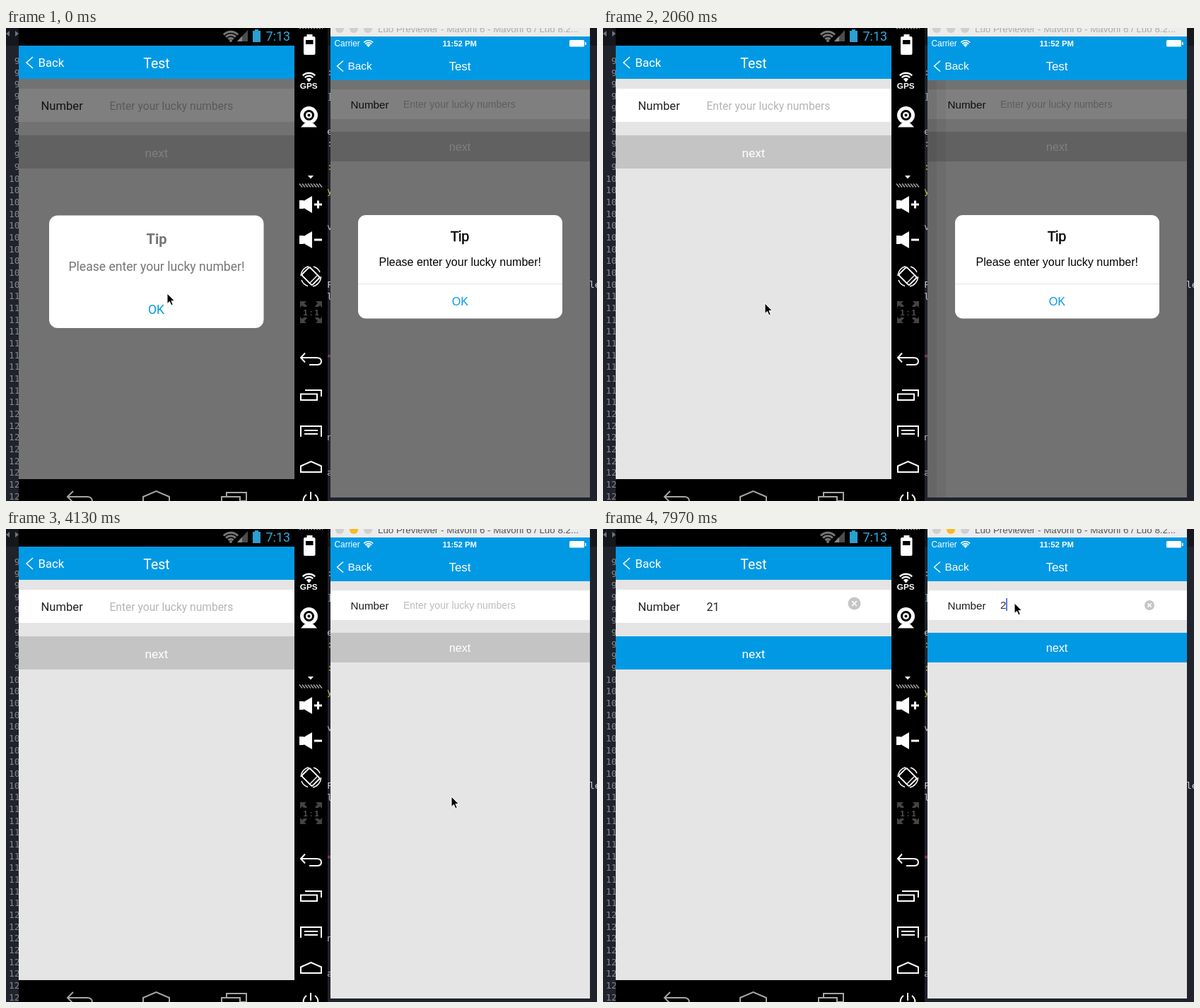
These frames come from a looping animation (836 px wide and 670 px high, 8000 ms). An HTML page:

```html
<!DOCTYPE html>
<html lang="en">
<head>
<meta charset="utf-8">
<title>Lucky number form</title>
<style>
html, body { margin: 0; width: 100%; height: 100%; overflow: hidden; background: #000; }
svg { display: block; width: 836px; height: 670px; }
.a { font-family: Roboto, sans-serif; }
.i { font-family: "Liberation Sans", Arial, sans-serif; }
.m { font-family: "DejaVu Sans Mono", monospace; }
</style>
</head>
<body>
<svg id="stage" viewBox="0 0 836 670" xmlns="http://www.w3.org/2000/svg"></svg>
<script>
const BLUE = '#0299e4', LOOP = 8000, STEP = 147.6;
const stage = document.getElementById('stage');

const rect = (x, y, w, h, fill, more = '') =>
  `<rect x="${x}" y="${y}" width="${w}" height="${h}" fill="${fill}" ${more}/>`;
const text = (cls, x, y, size, fill, str, more = '') =>
  `<text class="${cls}" x="${x}" y="${y}" font-size="${size}" fill="${fill}" ${more}>${str}</text>`;
const line = (d, color = '#fff', w = 2, more = '') =>
  `<path d="${d}" fill="none" stroke="${color}" stroke-width="${w}" ${more}/>`;
const shape = (d, fill = '#fff') => `<path d="${d}" fill="${fill}"/>`;
const disc = (x, y, r, fill, more = '') =>
  `<circle cx="${x}" cy="${y}" r="${r}" fill="${fill}" ${more}/>`;
const group = (id, body) => `<g id="${id}">${body}</g>`;
const MID = 'text-anchor="middle"';

// Fan of arcs above a point
const waves = (x, y, radii, color, w) => radii.map(r => {
  const k = r * 0.72;
  return line(`M${x - k} ${y - k}A${r} ${r} 0 0 1 ${x + k} ${y - k}`, color, w);
}).join('');

const clearButton = (id, x, y, r) => {
  const k = r * 0.38;
  return group(id, disc(x, y, r, '#c5c5c5') +
    line(`M${x - k} ${y - k}L${x + k} ${y + k}M${x + k} ${y - k}L${x - k} ${y + k}`, '#fff', 1.6));
};

function editor() {
  let s = rect(0, 0, 836, 670, '#20232c') + rect(0, 0, 836, 25, '#15171c');
  s += shape('M5 4V12L0 8ZM13 4V12L18 8Z', '#70747c');
  for (let n = 90; n < 128; n++)
    s += text('m', 27.5, 51 + (n - 90) * 16.67, 13, '#858a92', n, 'text-anchor="end"');
  const bits = [[67, ':', '#9aa'], [102, ']', '#9aa'], [151, 'e', '#ccc'], [168, ':', '#b9a45c'],
    [201, ':', '#b9b04c'], [235, 'y', '#c8c04c'], [286, 'v', '#bbb'], [368, 'F', '#ccc'],
    [385, 'l', '#ccc'], [468, '=', '#d0405c'], [584, 'n', '#bbb'], [634, 'a', '#bbb']];
  s += bits.map(([y, c, f]) => text('m', 454, y, 13, f, c)).join('');
  return s + text('m', 825, 368, 13, '#d0d2d6', 'le');
}

function leftPhone() {
  let s = rect(18, 0, 437, 670, '#000') + rect(18, 25, 390, 47, BLUE) + rect(18, 72, 390, 567, '#e5e5e5');
  s += waves(318, 19.5, [5, 9.5, 14], '#777', 3) + disc(318, 18, 2, '#777');
  s += shape('M327 19L342 3V19Z', '#4c4c4c') + shape('M327 19L334 11.5V19Z', '#888');
  s += rect(349, 4, 11, 16, '#2b9fd0') + rect(352, 2, 5, 2, '#2b9fd0');
  s += text('a', 367.5, 17.5, 18, '#33a9db', '7:13');
  s += line('M38 41L29 49L38 57', '#fff', 1.5) + text('a', 45.5, 55, 16.8, '#fff', 'Back');
  s += text('a', 213, 57, 19.5, '#fff', 'Test', MID);
  s += rect(18, 86, 390, 47, '#fff') + text('a', 49.5, 115.5, 16.6, '#222', 'Number');
  s += text('a', 146.5, 115.5, 15.6, '#b5b5b5', 'Enter your lucky numbers', 'id="hintL"');
  s += text('a', 146.5, 115.5, 16.2, '#222', '', 'id="valueL"');
  s += clearButton('clearL', 355.5, 105.5, 9) + rect(147, 98, 1.3, 21, '#111', 'id="caretL"');
  s += rect(18, 152, 390, 47, '#c4c4c4', 'id="nextL"') + text('a', 213, 182.5, 17.4, '#fff', 'next', MID);
  s += group('alertL', rect(18, 72, 390, 567, '#000', 'opacity=".5"') +
    rect(61, 265.5, 303.5, 159.5, '#fff', 'rx="12"') +
    text('a', 213, 306, 20, '#757575', 'Tip', MID + ' font-weight="700"') +
    text('a', 213, 344, 17.6, '#757575', 'Please enter your lucky number!', MID) +
    text('a', 212.5, 405, 17.6, BLUE, 'OK', MID));
  const nav = '#a5a5a5';
  s += line('M95 656L87 664L95 672M87 664H115Q122 664 122 671', nav);
  s += line('M194 672V664L212.5 656L231 664V672', nav);
  return s + line('M305 672V664H331V672M312 664V658H340V670H331', nav);
}

function speaker(y) {
  return rect(415, y - 6, 6, 12, '#fff') + shape(`M421 ${y - 5}L433 ${y - 12}V${y + 12}L421 ${y + 5}Z`) +
    rect(436, y - 1.5, 11, 3, '#fff');
}

function toolbar() {
  let s = line('M415 .5H448', '#999', 1.5, 'stroke-dasharray="2 2"');
  s += rect(421, 12, 16.5, 26, '#fff', 'rx="2"') + rect(425.5, 9, 8, 4, '#fff') + rect(424, 17, 10.5, 6, '#000');
  s += waves(428.5, 76, [4, 8, 12], '#fff', 2.4) + disc(428.5, 74, 2, '#fff');
  s += text('i', 428.3, 86, 11.8, '#fff', 'GPS', MID + ' font-weight="700"');
  s += disc(428.5, 123.5, 12.5, '#fff') + disc(428.5, 123.5, 7.5, '#000') + disc(428.5, 123.5, 4.5, '#fff');
  s += disc(428.5, 123.5, 2, '#000') + shape('M422 135H435L440 140.5H417Z');
  s += shape('M427 209H435L431 213.5Z');
  for (let x = 415; x < 447; x += 4) s += line(`M${x} 220.5l4 5`, '#aaa', 1.4);
  s += speaker(250) + rect(440, 244.5, 3, 11, '#fff') + speaker(300);
  s += '<g transform="rotate(-45 431 351.5)">' + rect(423, 341, 16, 21, 'none', 'rx="2" stroke="#fff" stroke-width="2"') +
    line('M424 357.5H438', '#fff', 1.3) + '</g>';
  s += line('M417 351A14.5 14.5 0 0 1 428 337.5M445.5 352A14.5 14.5 0 0 1 434 366M418 357A14 14 0 0 0 427 365.5M444 346A14 14 0 0 0 435 338', '#fff', 1.5);
  for (const [x, y] of [[-1, -1], [1, -1], [-1, 1], [1, 1]])
    s += `<g transform="translate(431.5 402.5) scale(${x} ${y})">` +
      shape('M15.5 15.5H6.5L9.5 12.5L5.5 8.5L8.5 5.5L12.5 9.5L15.5 6.5Z', '#444') + '</g>';
  s += rect(418, 395, 27, 15, '#000') + text('i', 431.5, 407, 11, '#555', '1 : 1', MID + ' font-weight="700"');
  s += line('M423 460.5L417 467L423 473.5M417 467H439Q446 467 446 472Q446 477 440 477H429');
  s += line('M417 518.5H440V527H417ZM423 513H446V522');
  s += line('M417 579V564H446V579M422 570H441M422 575H441');
  s += line('M417 629V620.5L431.5 614L446 620.5V629Z');
  return s + line('M431 657V668M425 661A11 11 0 0 0 421 672M437 661A11 11 0 0 1 441 672');
}

function rightPhone() {
  let s = rect(459, 0, 367, 12, '#ececec') + disc(472, 1, 6, '#cfcfcf') +
    disc(492, 1, 6, '#cfcfcf', 'id="light"') + disc(512, 1, 6, '#cfcfcf');
  s += text('i', 526, 6, 13.35, '#aaa', 'Luo Previewer - Mavoni 6 - Mavoni 6 / Luo 8.2...', 'id="title"');
  s += rect(459, 12, 367, 62, BLUE) + rect(459, 74, 367, 591, '#e5e5e5');
  s += text('i', 464.5, 26, 11.9, '#fff', 'Carrier');
  s += waves(512.7, 27, [3.5, 6.2, 9], '#fff', 1.7) + disc(512.7, 25.5, 1.3, '#fff');
  s += text('i', 641.8, 26, 11.3, '#fff', '11:52 PM', MID + ' font-weight="700"');
  s += rect(797, 17, 21, 9.5, '#fff', 'rx="1.5"') + rect(819, 20, 1.6, 4, '#fff');
  s += line('M477 46.5L468.5 54L477 61.5', '#fff', 1.4) + text('i', 483.5, 59, 15.4, '#fff', 'Back');
  s += text('i', 642, 60, 17, '#fff', 'Test', MID);
  s += rect(459, 87, 367, 42, '#fff') + text('i', 487.5, 113.5, 15.2, '#1c1c1c', 'Number');
  s += text('i', 562, 112.5, 14, '#bcbcbc', 'Enter your lucky numbers', 'id="hintR"');
  s += text('i', 562, 113, 15.2, '#333', '', 'id="valueR"');
  s += clearButton('clearR', 773, 108, 7) + rect(563, 98, 2, 18, '#5b7be8', 'id="caretR"');
  s += rect(459, 147, 367, 42, '#c4c4c4', 'id="nextR"') + text('i', 642, 174, 16.2, '#fff', 'next', MID);
  return s + group('alertR', rect(459, 74, 367, 591, '#000', 'opacity=".5"') +
    rect(498, 265, 289, 146.5, '#fff', 'rx="11"') + rect(498, 362, 289, 1, '#e2e2e2') +
    text('i', 642, 302, 19.5, '#000', 'Tip', MID + ' stroke="#000" stroke-width=".5"') +
    text('i', 642.3, 337, 16, '#000', 'Please enter your lucky number!', MID) +
    text('i', 642.3, 393, 16, BLUE, 'OK', MID));
}

stage.innerHTML = editor() + rightPhone() +
  group('shadow', rect(459, 74, 26, 591, '#000', 'opacity=".05"') + rect(459, 74, 13, 591, '#000', 'opacity=".06"')) +
  leftPhone() + toolbar() +
  '<path id="pointer" d="M0 0V14.5L3.4 11.4L5.8 16.8L8.2 15.7L5.9 10.5H10.4Z" fill="#000" stroke="#fff" stroke-width="1"/>';

const $ = Object.fromEntries([...stage.querySelectorAll('[id]')].map(e => [e.id, e]));
const show = (e, on) => e.setAttribute('visibility', on ? 'visible' : 'hidden');

// Pointer stops: step, x, y
const PATH = [[0, 228, 376], [5, 229, 390], [15, 229, 390], [17, 400, 384], [20, 686, 386], [23, 630, 379],
  [31, 630, 379], [33, 400, 300], [35, 177, 228], [45, 177, 228], [46, 400, 196],
  [47, 571, 158], [48, 600, 124], [50, 582, 105], [60, 582, 105]];

function pointerAt(n) {
  const k = PATH.findIndex(p => p[0] > n), a = PATH[k - 1], b = PATH[k];
  const f = (n - a[0]) / (b[0] - a[0]);
  return [a[1] + (b[1] - a[1]) * f, a[2] + (b[2] - a[2]) * f];
}

function fill(side, str, caretX, caretOn) {
  $['value' + side].textContent = str;
  show($['hint' + side], !str);
  show($['clear' + side], str);
  show($['caret' + side], caretOn);
  $['caret' + side].setAttribute('x', caretX);
  $['next' + side].setAttribute('fill', str ? BLUE : '#c4c4c4');
}

function draw(ms) {
  const n = Math.floor((ms + 10) / STEP);
  const phase = n * STEP % 1000, blink = phase >= 250 && phase < 750;
  const left = n < 40 ? '' : n < 42 ? '2' : '21';
  const right = n < 54 ? '' : '2';
  const active = n >= 27 && n < 39 || n >= 53;
  const shade = n < 2 || n >= 24 && n < 38 || n >= 52 ? 0 : n === 38 ? 0.5 : 1;

  fill('L', left, 147 + left.length * 9.1, n >= 14 && blink);
  fill('R', right, right ? 570 : 563, n >= 28 && (blink || n >= 53));
  show($.alertL, n < 14);
  show($.alertR, n < 28);
  $.shadow.setAttribute('opacity', shade);
  $.light.setAttribute('fill', active ? '#fdb924' : '#cfcfcf');
  $.title.setAttribute('fill', active ? '#555' : '#aaa');
  $.pointer.setAttribute('transform', `translate(${pointerAt(n)})`);
}

const start = performance.now();
function tick() {
  draw((performance.now() - start) % LOOP);
  requestAnimationFrame(tick);
}
tick();
</script>
</body>
</html>
```
